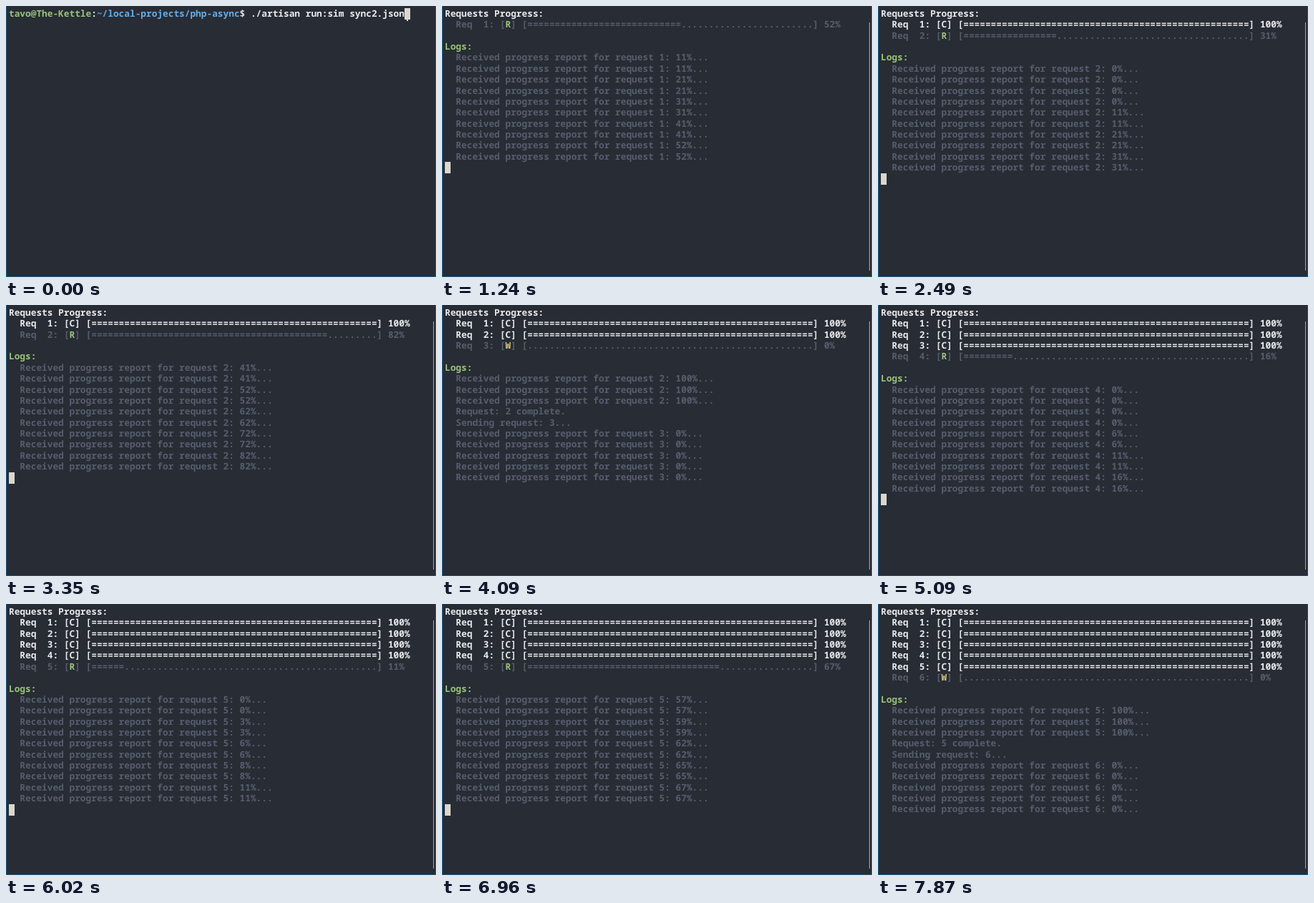
These frames come from a looping animation (601 by 379 pixels, 8 s). An HTML page with a canvas:

```html
<!DOCTYPE html>
<html lang="en">
<head>
<meta charset="utf-8">
<title>Terminal request progress</title>
<style>
  html, body { margin: 0; width: 100%; height: 100%; overflow: hidden; background: #282c34; }
  canvas { display: block; }
</style>
</head>
<body>
<canvas id="screen" width="601" height="379"></canvas>
<script>
const LOOP = 8000;
const CELL_W = 7.68, CELL_H = 15.36, LEFT = 4, TOP = 3.2, BASELINE = 11.8;
const BAR_CELLS = 52, LOG_ROWS = 10;
const COLOR = {
  back: '#282c34', edge: '#1a5580', text: '#e8e9ec', dim: '#575d6e',
  green: '#98c379', yellow: '#d2c078', blue: '#61afef', cursor: '#dbd6ce', scroll: '#a2a4a8'
};

// sent/first/done are times in ms; progress grows by `step` percent every `every` ms from `first` on
const requests = [
  { sent: 150,  first: 605,  every: 146,  step: 10.25,  done: 1935 },
  { sent: 1935, first: 2165, every: 158,  step: 10.25,  done: 3588 },
  { sent: 3588, first: 4165, every: 77,   step: 10.25,  done: 4859 },
  { sent: 4859, first: 5010, every: 38.5, step: 5.125,  done: 5789 },
  { sent: 5789, first: 5890, every: 42,   step: 2.5625, done: 7570 },
  { sent: 7570, first: Infinity, every: 1, step: 1, done: Infinity }
];
// the first request has more waiting reports, which arrive one after another
const firstReports = [150, 150, 150, 220, 220, 220, 220, 380, 450];
const cursorOff = [[4085, 4165], [4859, 4935], [7865, LOOP]];

const ctx = document.getElementById('screen').getContext('2d');
ctx.font = '600 12.8px "Noto Sans Mono", "DejaVu Sans Mono", monospace';
ctx.textRendering = 'geometricPrecision';

function write(row, col, text, color) {
  const y = Math.round(TOP + row * CELL_H + BASELINE);
  ctx.fillStyle = color;
  [...text].forEach((char, i) => {
    if (char !== ' ') ctx.fillText(char, LEFT + (col + i) * CELL_W, y);
  });
  return col + text.length;
}

function drawCursor(row, col) {
  ctx.fillStyle = COLOR.cursor;
  ctx.fillRect(Math.round(LEFT + col * CELL_W), Math.round(TOP + row * CELL_H), 8, 16);
}

function drawPrompt() {
  let col = write(0, 0, 'tavo@The-Kettle', COLOR.green);
  col = write(0, col, ':', COLOR.text);
  col = write(0, col, '~/local-projects/php-async', COLOR.blue);
  col = write(0, col, '$ ./artisan run:sim sync2.json', COLOR.text);
  drawCursor(0, col);
  ctx.fillRect(560, 18, 2, 3);
}

const tickCount = (req, t) => t < req.first ? 0 : 1 + Math.floor((t - req.first) / req.every);
const percentAt = (req, tick) => Math.min(100, Math.ceil(tick * req.step));

function drawRequest(req, id, t) {
  const done = t >= req.done;
  const percent = done ? 100 : percentAt(req, tickCount(req, t));
  const filled = Math.ceil(percent / 100 * BAR_CELLS);
  const color = done ? COLOR.text : COLOR.dim;
  const [state, stateColor] = done ? ['C', COLOR.text]
    : percent ? ['R', COLOR.green] : ['W', COLOR.yellow];
  let col = write(id, 0, `  Req  ${id}: [`, color);
  col = write(id, col, state, stateColor);
  write(id, col, `] [${'='.repeat(filled).padEnd(BAR_CELLS, '.')}] ${percent}%`, color);
}

function logLines(t) {
  const lines = [];
  requests.forEach((req, i) => {
    if (t < req.sent) return;
    const id = i + 1;
    const report = (percent, count) => {
      for (let n = 0; n < count; n++)
        lines.push(`Received progress report for request ${id}: ${percent}%...`);
    };
    lines.push(`Sending request: ${id}...`);
    report(0, i ? 5 : firstReports.filter(time => t >= time).length);
    const last = Math.min(tickCount(req, t), Math.ceil(100 / req.step));
    for (let tick = 1; tick <= last; tick++) report(percentAt(req, tick), 2);
    if (t >= req.done) {
      report(100, 1);
      lines.push(`Request: ${id} complete.`);
    }
  });
  return lines.slice(-LOG_ROWS);
}

function drawProgress(t) {
  ctx.fillStyle = COLOR.scroll;
  ctx.fillRect(597, 23, 1, 347);
  if (t < requests[0].sent) return drawCursor(0, 0);

  write(0, 0, 'Requests Progress:', COLOR.text);
  const active = requests.filter(req => t >= req.sent);
  active.forEach((req, i) => drawRequest(req, i + 1, t));

  const logRow = active.length + 2;
  const lines = logLines(t);
  write(logRow, 0, 'Logs:', COLOR.green);
  lines.forEach((line, i) => write(logRow + 1 + i, 2, line, COLOR.dim));
  if (!cursorOff.some(([from, to]) => t >= from && t < to)) drawCursor(logRow + 1 + lines.length, 0);
}

function drawWindow() {
  ctx.fillStyle = COLOR.edge;
  ctx.fillRect(0, 0, 601, 379);
  ctx.fillStyle = COLOR.back;
  ctx.fillRect(1, 0, 599, 378);
}

function frame() {
  const t = performance.now() % LOOP;
  drawWindow();
  if (t < 70) drawPrompt();
  else drawProgress(t);
  requestAnimationFrame(frame);
}
frame();
</script>
</body>
</html>
```
